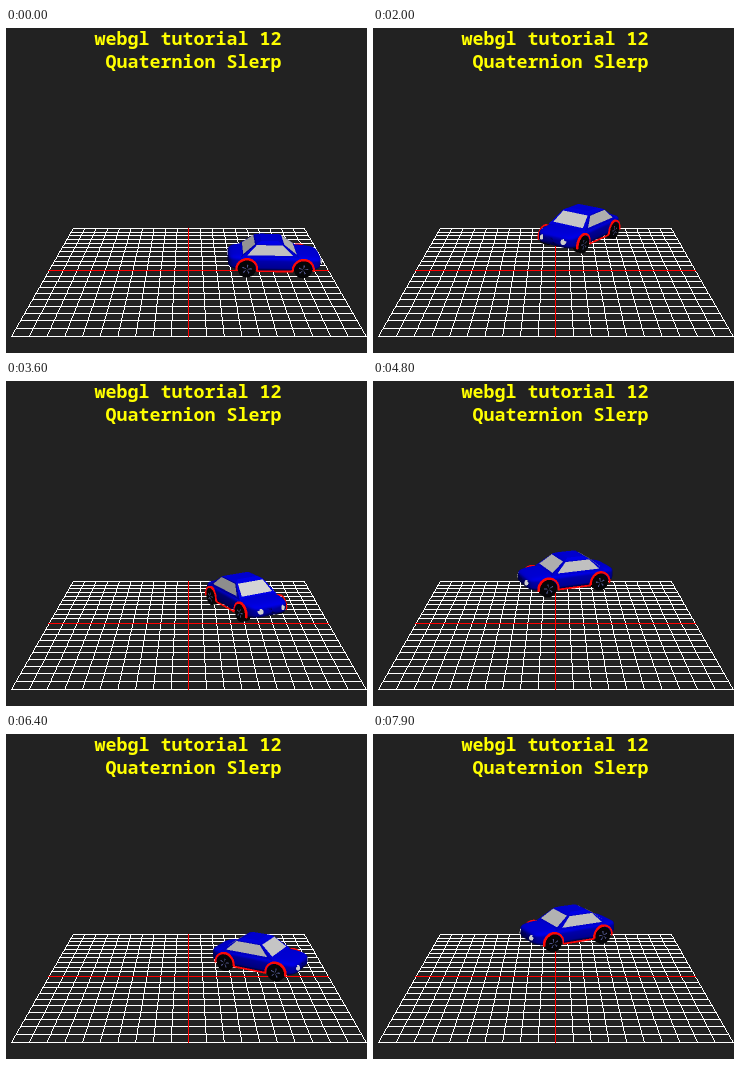
Write an HTML page with a canvas that moves like this. It is 361x325 px and loops after 8000 ms.

```html
<!DOCTYPE html>
<html lang="en">
<head>
<meta charset="utf-8">
<title>Quaternion Slerp</title>
<style>
html, body { margin: 0; width: 100%; height: 100%; overflow: hidden; background: #222; }
canvas, svg { position: absolute; left: 0; top: 0; width: 361px; height: 325px; }
text { font: bold 18.33px "Noto Sans Mono", "DejaVu Sans Mono", monospace; fill: #ff0; }
</style>
</head>
<body>
<canvas id="grid" width="361" height="325"></canvas>
<canvas id="car" width="361" height="325"></canvas>
<svg viewBox="0 0 361 325">
  <text x="88.5" y="17">webgl tutorial 12</text>
  <text x="99.5" y="40">Quaternion Slerp</text>
</svg>
<script>
const context = id => document.getElementById(id).getContext('2d');
const gridCtx = context('grid'), carCtx = context('car');
const TAU = 2 * Math.PI;

// Vectors
const add = (a, b, k = 1) => a.map((v, i) => v + b[i] * k);
const sub = (a, b) => add(a, b, -1);
const dot = (a, b) => a.reduce((sum, v, i) => sum + v * b[i], 0);
const mix = (a, b, t) => add(a, sub(b, a), t);
const unit = a => a.map(v => v / (Math.hypot(...a) || 1));
const cross = (a, b) => [a[1] * b[2] - a[2] * b[1], a[2] * b[0] - a[0] * b[2], a[0] * b[1] - a[1] * b[0]];

// Camera looks down at the origin.
const FOCAL = 616.7, DIST = 44.07, SIN = 0.3675, COS = 0.93;
const CX = 182.8, CY = 242.9;
function project([x, y, z]) {
  const d = DIST - z * COS - y * SIN;
  return [CX + FOCAL * x / d, CY - FOCAL * (y * COS - z * SIN) / d, 1 / d];
}

// Hard-edged line, one pixel wide.
function drawLine(from, to, color) {
  const a = project(from), b = project(to);
  const steps = Math.ceil(Math.max(Math.abs(b[0] - a[0]), Math.abs(b[1] - a[1])));
  gridCtx.fillStyle = color;
  for (let i = 0; i <= steps; i++) {
    const [x, y] = mix(a, b, i / steps);
    gridCtx.fillRect(Math.floor(x), Math.floor(y), 1, 1);
  }
}

function drawCross(i, color) {
  drawLine([i, 0, -10], [i, 0, 10], color);
  drawLine([-10, 0, i], [10, 0, i], color);
}

for (let i = -10; i <= 10; i++) drawCross(i, '#fff');
drawCross(0, '#f00');

// Car model: x forward, y up, z to the side.
const BLUE = [0, 0, 235], GLASS = [215, 215, 215], RED = [250, 8, 8];
const TYRE = [5, 5, 7], HUB = [80, 85, 140], LAMP = [205, 205, 205];
const MIDDLE = [0, 0.95, 0];
const faces = [];

const outward = (n, p) => dot(n, sub(p, MIDDLE)) < 0 ? n.map(v => -v) : n;
const faceNormal = p => outward(unit(cross(sub(p[1], p[0]), sub(p[3], p[0]))), p[0]);
const addPlain = (points, color) => faces.push({ points, color });
const addLit = (points, color, normals) => faces.push({ points, color, normals });

// Lower body: rounded box that tapers towards both ends.
function hull(u, a) {
  const s = Math.sin(u * Math.PI / 2);
  const taper = (1 - Math.abs(s) ** 5) ** 0.25;
  const low = 0.85 - 0.5 * taper;
  const high = 1.05 + 0.47 * taper - 0.1 * Math.max(0, s);
  const round = v => Math.sign(v) * Math.abs(v) ** 0.4;
  return [
    3.25 * s,
    (low + high) / 2 + (high - low) / 2 * round(Math.sin(a)),
    1.64 * taper ** 0.7 * round(Math.cos(a))
  ];
}

function hullNormal(u, a) {
  const e = 0.04, p = hull(u, a);
  const along = sub(hull(Math.min(u + e, 0.995), a), hull(Math.max(u - e, -0.995), a));
  return outward(unit(cross(along, sub(hull(u, a + e), hull(u, a - e)))), p);
}

function buildHull() {
  const n = 26;
  for (let i = 0; i < n; i++) {
    for (let j = 0; j < n; j++) {
      const u0 = 2 * i / n - 1, u1 = u0 + 2 / n;
      const a0 = (j + 0.5) * TAU / n, a1 = a0 + TAU / n;
      const corners = [[u0, a0], [u1, a0], [u1, a1], [u0, a1]];
      addLit(corners.map(c => hull(...c)), BLUE, corners.map(c => hullNormal(...c)));
    }
  }
}

// Cabin: stacked rectangles with glass set into the lower storey.
const deck = (back, front, z, y) => [[back, y, z], [front, y, z], [front, y, -z], [back, y, -z]];

function addPanel(points, color) {
  const n = faceNormal(points);
  addLit(points, color, points.map(() => n));
}

function buildWall(lower, upper, glass) {
  lower.forEach((p, i) => {
    const k = (i + 1) % 4, quad = [p, lower[k], upper[k], upper[i]];
    addPanel(quad, BLUE);
    if (!glass) return;
    const n = faceNormal(quad);
    const at = (u, v) => add(mix(mix(p, lower[k], u), mix(upper[i], upper[k], u), v), n, 0.03);
    addPanel([at(0.07, 0.16), at(0.93, 0.16), at(0.95, 0.92), at(0.05, 0.92)], GLASS);
  });
}

function buildCabin() {
  const base = deck(-2.35, 1.65, 1.53, 1.4);
  const roof = deck(-1.3, 0.5, 1.12, 2.25);
  const cap = deck(-0.95, 0.2, 0.8, 2.38);
  buildWall(base, roof, true);
  buildWall(roof, cap, false);
  addPanel(cap, BLUE);
}

function buildWheel(x, side) {
  const n = 20, turn = TAU / n;
  const rim = (r, a, z) => [x + r * Math.cos(a), 0.6 + r * Math.sin(a), side * z];
  const band = (a, step, r0, z0, r1, z1, color) =>
    addPlain([rim(r0, a, z0), rim(r0, a + step, z0), rim(r1, a + step, z1), rim(r1, a, z1)], color);
  for (let i = 0; i < n; i++) {
    const a = i * turn;
    band(a, turn, 0.62, 1.68, 0.62, 1.2, TYRE);
    band(a, turn, 0.62, 1.68, 0, 1.68, TYRE);
    if (i % 4 === 0) band(a, turn, 0.34, 1.7, 0.05, 1.7, HUB);
    if (i <= n / 2) {
      band(a - turn / 2, turn, 0.65, 1.7, 0.79, 1.7, RED);
      band(a - turn / 2, turn, 0.79, 1.7, 0.79, 1.58, RED);
    }
  }
}

function buildLamp(side) {
  const points = [];
  for (let a = 0; a < TAU; a += TAU / 12) {
    const dz = 0.2 * Math.cos(a), dy = 0.19 * Math.sin(a);
    points.push([3.25 - 0.35 * dz - 0.3 * dy, 0.98 + dy, side * (0.92 + dz)]);
  }
  addPlain(points, LAMP);
}

buildHull();
buildCabin();
for (const side of [-1, 1]) {
  for (const x of [-1.94, 1.94]) buildWheel(x, side);
  buildLamp(side);
  addPlain(deck(-1.25, 1.25, 0, 0).map(([x], i) => [x, i < 2 ? 0.4 : 0.53, side * 1.67]), RED);
}

// Small depth-buffered renderer, drawn at double size and scaled down.
const SCALE = 2, W = 280, H = 220;
const layer = document.createElement('canvas');
layer.width = W;
layer.height = H;
const layerCtx = layer.getContext('2d');
const image = layerCtx.createImageData(W, H);
const depth = new Float32Array(W * H);

// Vertices are [x, y, depth, shade].
function fillTriangle(a, b, c, color) {
  const abx = b[0] - a[0], aby = b[1] - a[1], acx = c[0] - a[0], acy = c[1] - a[1];
  const area = abx * acy - aby * acx;
  if (Math.abs(area) < 1e-6) return;
  const low = i => Math.max(0, Math.floor(Math.min(a[i], b[i], c[i])));
  const high = (i, end) => Math.min(end - 1, Math.ceil(Math.max(a[i], b[i], c[i])));
  const x0 = low(0), x1 = high(0, W), y0 = low(1), y1 = high(1, H);
  for (let y = y0; y <= y1; y++) {
    for (let x = x0; x <= x1; x++) {
      const dx = x + 0.5 - a[0], dy = y + 0.5 - a[1];
      const v = (dx * acy - dy * acx) / area, w = (abx * dy - aby * dx) / area;
      if (v < 0 || w < 0 || v + w > 1) continue;
      const blend = i => a[i] + v * (b[i] - a[i]) + w * (c[i] - a[i]);
      const z = blend(2), k = y * W + x;
      if (z <= depth[k]) continue;
      depth[k] = z;
      const shade = blend(3);
      for (let i = 0; i < 3; i++) image.data[k * 4 + i] = color[i] * shade;
      image.data[k * 4 + 3] = 255;
    }
  }
}

const LIGHT = unit([0.1, 0.83, 0.55]), AMBIENT = 0.28;
const START = [6.1, 0, -0.3], END = [-0.1, 2.8, -1.1];

function drawCar(t) {
  const pos = mix(START, END, t);
  const c = Math.cos(Math.PI * t), s = Math.sin(Math.PI * t);
  const turn = ([x, y, z]) => [x * c - z * s, y, x * s + z * c];
  const lit = n => AMBIENT + (1 - AMBIENT) * Math.max(0, dot(turn(n), LIGHT));
  const [mx, my] = project(pos);
  const left = Math.round(mx - W / SCALE / 2), top = Math.round(my - 72);

  image.data.fill(0);
  depth.fill(0);
  for (const { points, color, normals } of faces) {
    const p = points.map((point, i) => {
      const [x, y, d] = project(add(turn(point), pos));
      return [(x - left) * SCALE, (y - top) * SCALE, d, normals ? lit(normals[i]) : 1];
    });
    for (let i = 2; i < p.length; i++) fillTriangle(p[0], p[i - 1], p[i], color);
  }
  layerCtx.putImageData(image, 0, 0);
  carCtx.clearRect(0, 0, 361, 325);
  carCtx.drawImage(layer, left, top, W / SCALE, H / SCALE);
}

// Back and forth between both poses, one step every 100 ms.
const STEP = 100, STEPS = 80, HALF = 15.3, OFFSET = 0.2;
const begin = performance.now();
let last = -1;

function tick() {
  const step = Math.floor(Math.max(0, performance.now() - begin) / STEP) % STEPS;
  if (step !== last) {
    const phase = Math.abs(step - OFFSET) / HALF % 2;
    drawCar(Math.min(phase, 2 - phase));
    last = step;
  }
  requestAnimationFrame(tick);
}
tick();
</script>
</body>
</html>
```
